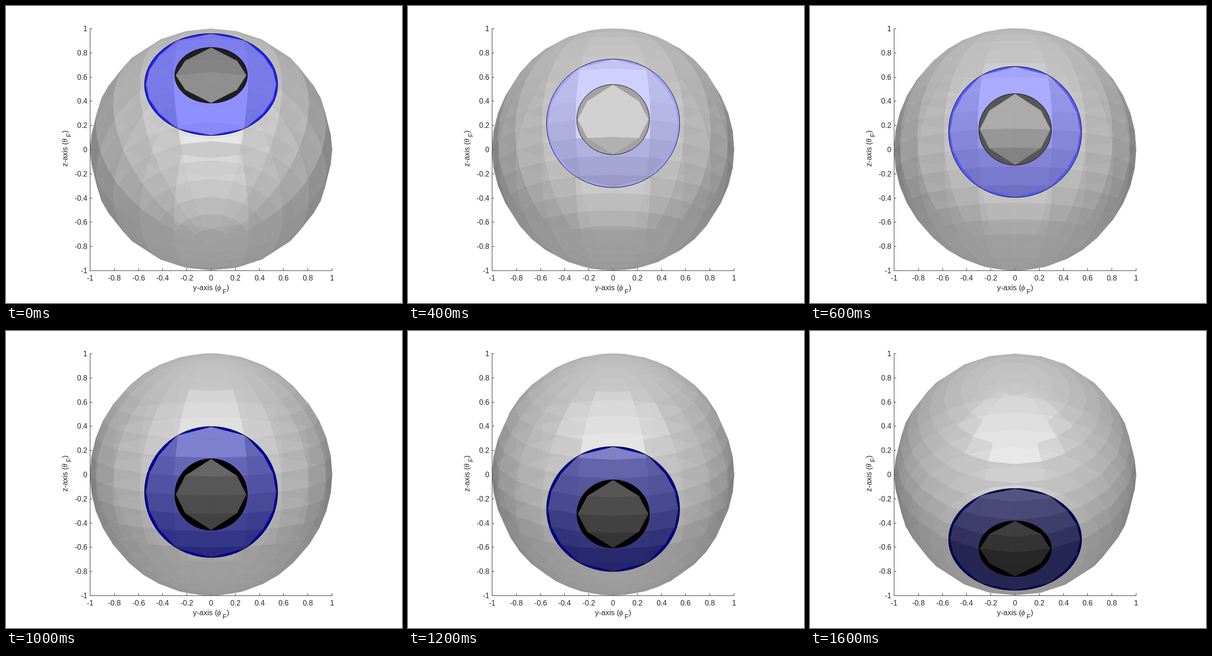
These frames come from a looping animation (864 by 648 pixels, 1800 ms). An HTML page with a canvas:

```html
<!DOCTYPE html>
<html lang="en">
<head>
<meta charset="utf-8">
<title>Rotating eye</title>
<style>
  html, body { margin: 0; width: 100%; height: 100%; overflow: hidden; background: #fff; }
  canvas { display: block; }
</style>
</head>
<body>
<canvas id="stage" width="864" height="648"></canvas>
<script>
const W = 864, H = 648, CX = 447.5, CY = 313, R = 264;
const STEP = 200, ANGLES = [40, 30, 15, 10, 0, -10, -20, -30, -40];
const RAD = Math.PI / 180, INK = '#262626';
const ctx = document.getElementById('stage').getContext('2d');
const layerCanvas = document.createElement('canvas');
layerCanvas.width = W;
layerCanvas.height = H;
const layer = layerCanvas.getContext('2d');

const onSphere = (az, el) => [
  Math.cos(el * RAD) * Math.cos(az * RAD),
  Math.cos(el * RAD) * Math.sin(az * RAD),
  Math.sin(el * RAD)
];

const facets = [];
for (let el = -90; el < 90; el += 9)
  for (let az = -180; az < 180; az += 18)
    facets.push({
      normal: onSphere(az + 9, el + 4.5),
      points: [onSphere(az, el), onSphere(az + 18, el), onSphere(az + 18, el + 9), onSphere(az, el + 9)]
    });

// Pitch about the y axis; the viewer looks along -x.
const rotate = ([x, y, z], a) => [
  x * Math.cos(a) - z * Math.sin(a), y, x * Math.sin(a) + z * Math.cos(a)
];

// Phong shading with the light at 45 degrees above the viewer.
function shade([x, y, z], base) {
  const dot = (x + z) * Math.SQRT1_2;
  const mirror = Math.max(0, 2 * dot * x - Math.SQRT1_2);
  const diffuse = 0.3 + 0.6 * Math.max(0, dot);
  const specular = dot > 0 ? 0.9 * mirror ** 10 : 0;
  const rgb = base.map(c => Math.round(255 * Math.min(1, c * diffuse + specular)));
  return `rgb(${rgb})`;
}

// Keeps the part of a polygon beyond the plane x = min.
function clip(points, min) {
  const out = [];
  points.forEach((p, i) => {
    const q = points[(i + 1) % points.length];
    if (p[0] >= min) out.push(p);
    if ((p[0] >= min) !== (q[0] >= min)) {
      const k = (min - p[0]) / (q[0] - p[0]);
      out.push(p.map((v, j) => v + (q[j] - v) * k));
    }
  });
  return out;
}

// Facets are painted solid, then blended as one sheet to avoid seams.
function drawShell(angle, side, min = -2) {
  layer.clearRect(0, 0, W, H);
  layer.lineWidth = 0.6;
  layer.lineJoin = 'round';
  for (const { normal, points } of facets) {
    const n = rotate(normal, angle);
    if (n[0] * side <= 0) continue;
    const shape = clip(points, min);
    if (shape.length < 3) continue;
    layer.beginPath();
    for (const p of shape) {
      const [, y, z] = rotate(p, angle);
      layer.lineTo(CX + R * y, CY - R * z);
    }
    layer.closePath();
    layer.fillStyle = layer.strokeStyle = shade(n.map(v => v * side), [1, 1, 1]);
    layer.fill();
    layer.stroke();
  }
  ctx.globalAlpha = 0.5;
  ctx.drawImage(layerCanvas, 0, 0);
  ctx.globalAlpha = 1;
}

function drawDisc(angle, radius, color) {
  const depth = Math.sqrt(1 - radius * radius);
  ctx.beginPath();
  ctx.ellipse(CX, CY - R * depth * Math.sin(angle), R * radius, R * radius * Math.cos(angle), 0, 0, 7);
  ctx.fillStyle = shade(rotate([1, 0, 0], angle), color);
  ctx.fill();
  ctx.strokeStyle = '#000';
  ctx.lineWidth = 1;
  ctx.stroke();
  drawShell(angle, 1, depth);
}

function text(str, x, y, font, align = 'left') {
  ctx.font = font;
  ctx.textAlign = align;
  ctx.fillText(str, x, y);
}

function axisLabel(name, symbol, x, y, turn) {
  const sans = '"Liberation Sans", Arial, sans-serif';
  ctx.save();
  ctx.translate(x, y);
  ctx.rotate(turn);
  text(name + '-axis (', 0, 0, '16.5px ' + sans);
  text(symbol, 57, 0, 'italic 17px "Liberation Serif", "Noto Serif", serif', 'center');
  text('F', 64.5, 8, '14px ' + sans);
  text(')', 73.5, 0, '16.5px ' + sans);
  ctx.restore();
}

function drawAxes() {
  const font = '16px "Liberation Sans", Arial, sans-serif';
  ctx.fillStyle = ctx.strokeStyle = INK;
  ctx.lineWidth = 1;
  ctx.beginPath();
  ctx.moveTo(183.5, 49);
  ctx.lineTo(183.5, 577.5);
  ctx.lineTo(712, 577.5);
  for (let i = -5; i <= 5; i++) {
    const x = Math.round(CX + R * i / 5 - 0.5) + 0.5;
    const y = Math.round(CY - R * i / 5) + 0.5;
    ctx.moveTo(x, 577);
    ctx.lineTo(x, 572);
    ctx.moveTo(183, y);
    ctx.lineTo(188, y);
    text(i / 5, x, 599, font, 'center');
    text(i / 5, 177.5, y + 5.5, font, 'right');
  }
  ctx.stroke();
  axisLabel('y', 'ϕ', 408, 620, 0);
  axisLabel('z', 'θ', 134, 350.5, -Math.PI / 2);
}

function draw(now) {
  const angle = ANGLES[Math.floor(now / STEP) % ANGLES.length] * RAD;
  ctx.fillStyle = '#fff';
  ctx.fillRect(0, 0, W, H);
  drawAxes();
  drawShell(angle, -1);
  drawShell(angle, 1);
  drawDisc(angle, 0.55, [0, 0, 1]);
  drawDisc(angle, 0.3, [0, 0, 0]);
  requestAnimationFrame(draw);
}
requestAnimationFrame(draw);
</script>
</body>
</html>
```
